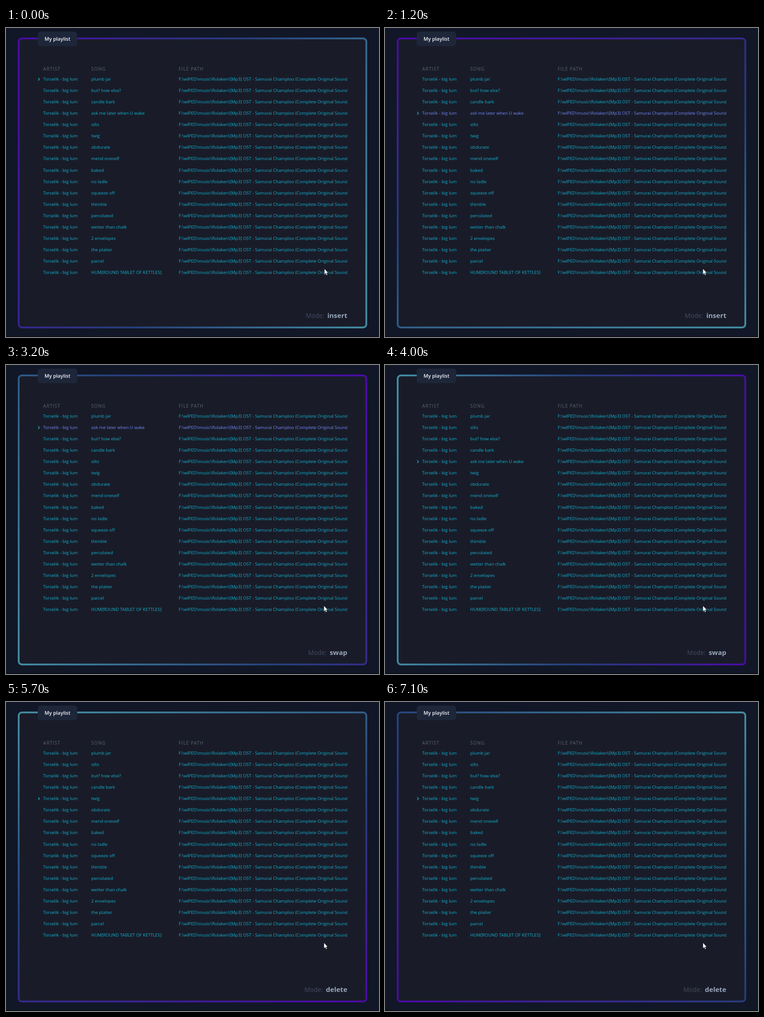
Animation, 823 px wide and 681 px high, one loop 7200 ms. Source, as an HTML page:

```html
<!DOCTYPE html>
<html lang="en">
<head>
<meta charset="utf-8">
<title>My playlist</title>
<style>
  html, body { margin: 0; width: 100%; height: 100%; overflow: hidden; background: #111727; }
  body { font: 9.7px/20px "Open Sans", sans-serif; color: #14b1d1; white-space: pre; }
  body * { position: fixed; }
  #panel {
    left: 26px; top: 21px; width: 763px; height: 633px; border: 4px solid transparent; border-radius: 9px;
    background: linear-gradient(#191c28, #191c28) padding-box,
      linear-gradient(var(--angle), #4a0aa5, #263f78, #438ba0) border-box;
  }
  #tab {
    left: 70px; top: 8px; width: 87px; height: 32px; border-radius: 6px; background: #1e263a;
    color: #f4f6fa; font-size: 11px; font-weight: 600; line-height: 31px; text-align: center;
  }
  #base { left: 0; bottom: 0; width: 100%; height: 2px; background: #0b0f19; }
  .row {
    display: grid; grid-template-columns: 106px 193px 1fr;
    left: 82px; width: 671px; height: 20px; overflow: hidden;
  }
  .row[hidden] { display: none; }
  .row span, #mode b { position: static; }
  .head { top: 80px; color: #5b6072; font-size: 10px; letter-spacing: 1.1px; }
  .picked { color: #7488f8; }
  .doomed { color: #f07078; }
  .doomed span { text-decoration: line-through; }
  #caret { left: 70px; width: 6px; height: 8px; fill: none; stroke: #2bb5d4; stroke-width: 1.2; }
  #mode { right: 70px; top: 623px; font-size: 13.7px; color: #454a60; }
  #mode b { margin-left: 7px; font-size: 15px; color: #98a5ba; }
  #pointer { top: 530px; width: 10px; height: 16px; fill: #fff; stroke: #10131c; stroke-width: .6; }
</style>
</head>
<body>
<div id="panel"></div>
<div id="tab">My playlist</div>
<div class="row head"><span>ARTIST</span><span>SONG</span><span>FILE PATH</span></div>
<div id="list"></div>
<svg id="caret"><path d="M1 1 4 4 1 7"/></svg>
<div id="mode">Mode:<b></b></div>
<div id="base"></div>
<svg id="pointer"><path d="M.5.5V13L3.4 10.4 5.3 15 7.3 14.1 5.4 9.7H9Z"/></svg>
<script>
const LOOP = 7200, STEP = 100;
const ARTIST = 'Torselik - big lum';
const PATH = 'F:\\wIPED\\music\\Rolaken\\[Mp3] OST - Samurai Champloo (Complete Original Soundtrack)';
const SONGS = ['plumb jar', 'but? how else?', 'candle bark', 'ask me later when U wake', 'silts', 'twig',
  'obdurate', 'mend oneself', 'baked', 'no ladle', 'squeeze off', 'thimble', 'percolated',
  'wetter than chalk', '2 envelopes', 'the plaiter', 'parcel', 'HUM[ROUND TABLET OF KETTLES]'];

const find = id => document.getElementById(id);
const list = find('list'), caret = find('caret'), pointer = find('pointer'), panel = find('panel');
const modeName = document.querySelector('#mode b');
const rowTop = i => 103 + i * 25.07;

const rows = SONGS.map((_, i) => {
  const row = document.createElement('div');
  row.style.top = rowTop(i) + 'px';
  for (const text of [ARTIST, '', PATH]) {
    row.appendChild(document.createElement('span')).textContent = text;
  }
  list.append(row);
  return row;
});

// Editing session: [time, action]
const SESSION = [
  [300, s => s.cursor = 1],
  [500, s => s.cursor = 2],
  [700, s => s.cursor = 3],
  [1000, s => s.marked = 3],
  [1600, s => s.cursor = 2],
  [1800, s => s.cursor = 1],
  [2200, s => { s.songs.splice(1, 0, s.songs.splice(3, 1)[0]); s.marked = -1; }],
  [2700, s => s.mode = 'swap'],
  [3000, s => s.marked = 1],
  [3300, s => s.cursor = 2],
  [3500, s => s.cursor = 3],
  [3700, s => s.cursor = 4],
  [3900, s => { [s.songs[1], s.songs[4]] = [s.songs[4], s.songs[1]]; s.marked = -1; }],
  [4500, s => s.mode = 'delete'],
  [4800, s => s.marked = 4],
  [5600, s => { s.songs.splice(4, 1); s.marked = -1; }],
];

function stateAt(t) {
  const state = { songs: [...SONGS], cursor: 0, marked: -1, mode: 'insert' };
  for (const [time, act] of SESSION) if (t >= time) act(state);
  return state;
}

function draw(now) {
  const t = Math.floor(now % LOOP / STEP) * STEP;
  const { songs, cursor, marked, mode } = stateAt(t);
  rows.forEach((row, i) => {
    row.hidden = i >= songs.length;
    row.children[1].textContent = songs[i] || '';
    row.className = 'row' + (i !== marked ? '' : mode === 'delete' ? ' doomed' : ' picked');
  });
  caret.style.top = rowTop(cursor) + 6 + 'px';
  modeName.textContent = mode;
  pointer.style.left = (t < 300 ? 702 : 701) + 'px';
  panel.style.setProperty('--angle', 112 + t * 0.04 + 'deg');
}

function tick() {
  draw(performance.now());
  requestAnimationFrame(tick);
}
tick();
</script>
</body>
</html>
```
